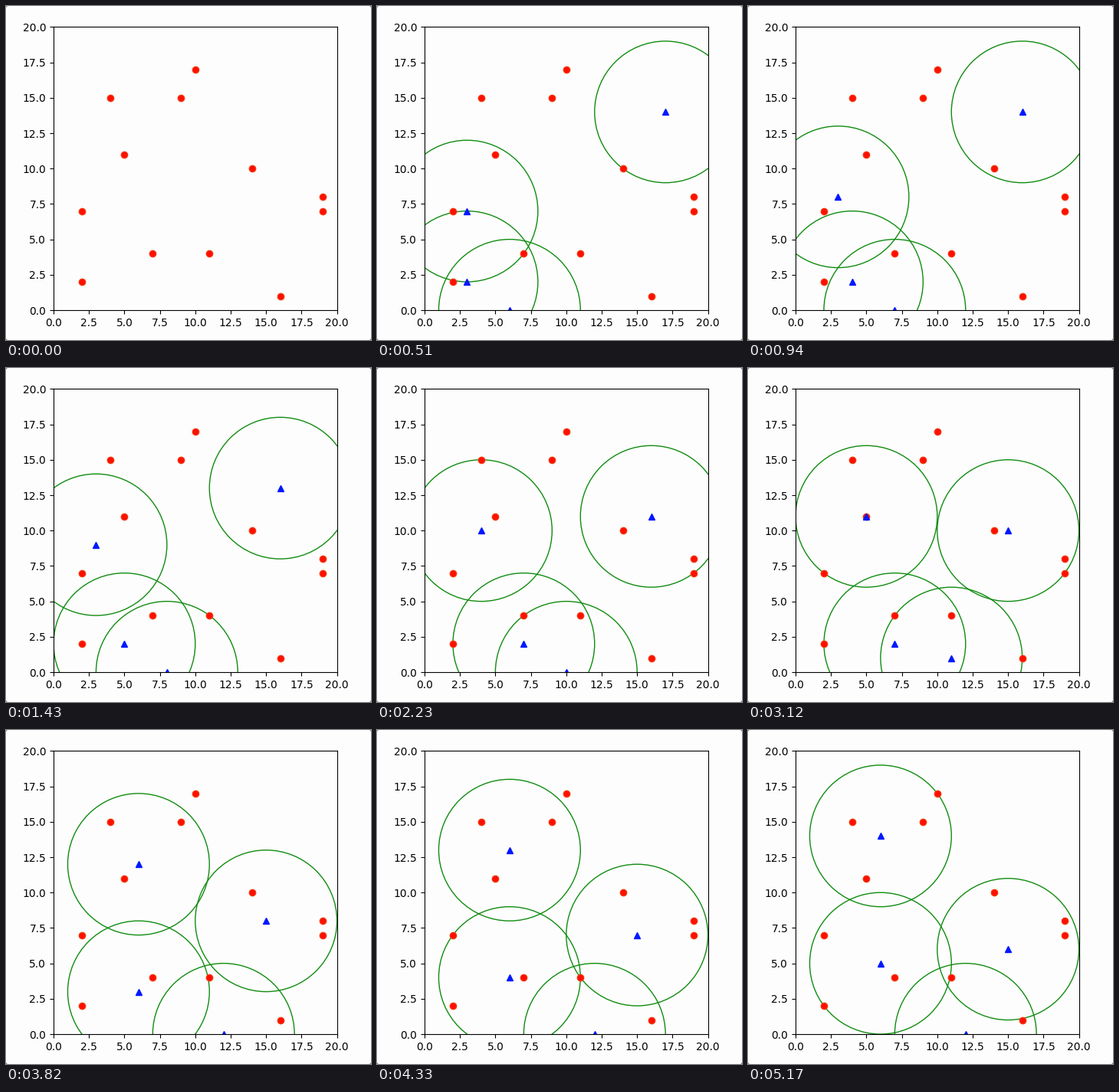
A matplotlib script that plays this animation: 476x436 px, repeating every 5260 ms.

```python
import matplotlib.pyplot as plt
from matplotlib.animation import FuncAnimation
from matplotlib.patches import Circle, Polygon

W, H, DPI = 476, 436, 100
LEFT, BOTTOM, SIDE = 62, 39, 369.6   # plot area in pixels
LOOP, TICK = 5260, 20                # ms
DELAY, STEP = 20, 397                # ms before the first step, ms per step
RADIUS = 5

POINTS = [(2, 2), (2, 7), (4, 15), (5, 11), (7, 4), (9, 15),
          (10, 17), (11, 4), (14, 10), (16, 1), (19, 7), (19, 8)]

# Start cell and unit moves of each station ('.' = stay)
ROUTES = [((17, 14), "LDDDDLDDDD"),
          ((3, 7), "UUURURURUU"),
          ((3, 2), "RRRR..LUUU"),
          ((6, 0), "RRRRRURD..")]
MOVES = {"L": (-1, 0), "R": (1, 0), "U": (0, 1), "D": (0, -1), ".": (0, 0)}


def walk(start, moves):
    path = [start]
    for m in moves:
        x, y = path[-1]
        dx, dy = MOVES[m]
        path.append((x + dx, y + dy))
    return path


paths = [walk(*route) for route in ROUTES]
last = len(paths[0])

plt.rcParams["font.family"] = "DejaVu Sans"
fig = plt.figure(figsize=(W / DPI, H / DPI), dpi=DPI, facecolor="#fdfdfd")
ax = fig.add_axes([LEFT / W, BOTTOM / H, SIDE / W, SIDE / H],
                  facecolor="#fdfdfd")
ax.set(xlim=(0, 20), ylim=(0, 20))

# Dark window corners
for cx, sx in ((0, 1), (W, -1)):
    for cy, sy in ((0, 1), (H, -1)):
        corner = [(cx, cy), (cx + 2 * sx, cy), (cx, cy + 2 * sy)]
        fig.add_artist(Polygon(corner, transform=None, fc="#8c8c8c", lw=0))

ax.plot(*zip(*POINTS), "o", ms=6, mfc="#ff0d00", mec="#f4360c")
stations, = ax.plot([], [], "^", ms=6, color="#0018ff")
rings = [ax.add_patch(Circle((0, 0), RADIUS, fill=False, ec="#108c10", lw=1))
         for _ in paths]


def draw(i):
    k = min(max(0, i * TICK - DELAY) // STEP, last)
    spots = [path[k - 1] for path in paths] if k else []
    stations.set_data([x for x, _ in spots], [y for _, y in spots])
    for ring in rings:
        ring.set_visible(k > 0)
    for ring, spot in zip(rings, spots):
        ring.center = spot
    return [stations, *rings]


anim = FuncAnimation(fig, draw, frames=LOOP // TICK, interval=TICK,
                     repeat=True, repeat_delay=0)
plt.show()
```
